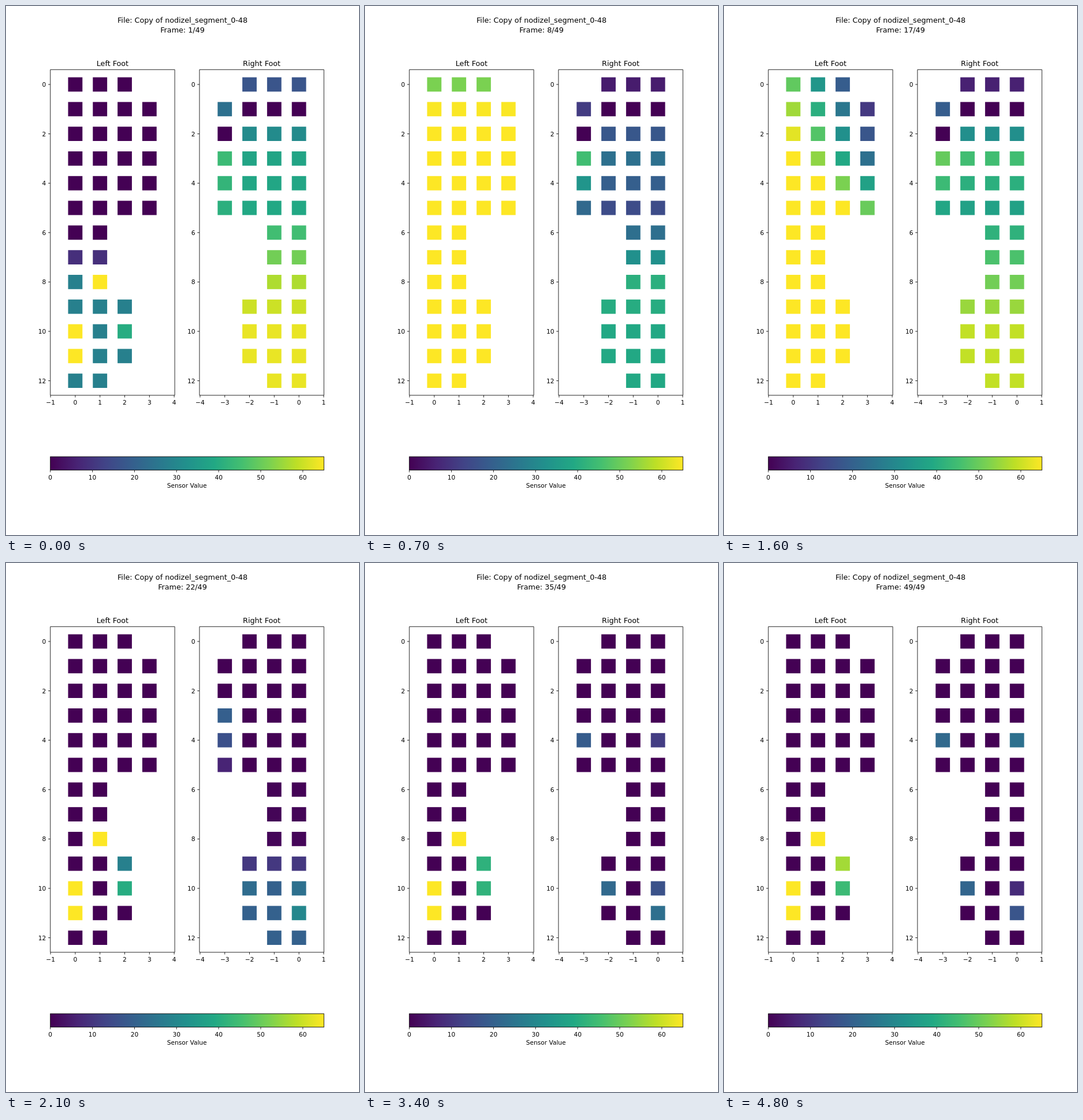
These frames come from a looping animation (611 by 917 pixels, 4.9 s). An HTML page:

```html
<!DOCTYPE html>
<html lang="en">
<head>
<meta charset="utf-8">
<title>Foot pressure</title>
<style>
  html, body { margin: 0; width: 100%; height: 100%; overflow: hidden; background: #fff; }
  svg { display: block; width: 611px; height: 917px; }
  text { font: 10.61px "DejaVu Sans", Verdana, sans-serif; fill: #000; text-anchor: middle; }
  text.big { font-size: 12.73px; }
  text.end { text-anchor: end; }
  .line { fill: none; stroke: #000; stroke-width: .85; }
</style>
</head>
<body>
<svg id="stage" viewBox="0 0 611 917"></svg>
<script>
const STEP = 100, STEPS = 49, MAX = 65;
const PITCH = 42.8, SIZE = 24.8, ROW0 = 136;
const VIRIDIS = ['440154', '482475', '414487', '355f8d', '2a788e', '21918c',
                 '22a884', '44bf70', '7ad151', 'bddf26', 'fde725'];
const RGB = VIRIDIS.map(h => [0, 2, 4].map(i => parseInt(h.slice(i, i + 2), 16)));
const stage = document.getElementById('stage');

const clamp = (v, lo, hi) => Math.min(Math.max(v, lo), hi);
const mix = (a, b, t) => a + (b - a) * t;
const signed = n => String(n).replace('-', '\u2212');

function add(tag, attrs, text, parent = stage) {
  const el = document.createElementNS('http://www.w3.org/2000/svg', tag);
  for (const k in attrs) el.setAttribute(k, attrs[k]);
  if (text !== undefined) el.textContent = text;
  parent.appendChild(el);
  return el;
}
const label = (x, y, text, cls = '') => add('text', { x, y, class: cls }, text);
const line = d => add('path', { d, class: 'line' });

function color(value) {
  const p = clamp(value / MAX, 0, 1) * 10;
  const i = Math.min(Math.floor(p), 9);
  return `rgb(${RGB[i].map((c, k) => Math.round(mix(c, RGB[i + 1][k], p - i)))})`;
}

// Index of the segment holding v in ascending points, and the position within it.
function locate(points, v) {
  const i = clamp(points.findIndex(p => p >= v) - 1, 0, points.length - 2);
  return [i, (v - points[i]) / (points[i + 1] - points[i])];
}

// Each gait key gives the load at these rows, then the strength of the sideways tilt.
const ZONES = [0, 3, 5, 8, 10, 12];
const feet = {
  left: {
    gait: {
      0: { load: [0, 0, -30, 28, 28], tilt: 0 },
      7: { load: [52, 90, 90, 90, 90], tilt: 0 },
      12: { load: [62, 90, 90, 90, 90], tilt: 0 },
      16: { load: [34, 54, 80, 90, 90], tilt: 15 },
      21: { load: [0, 0, 0, 0, 0], tilt: 0 }
    },
    lean: (row, i) => 1 - i,
    dead: () => false,
    // Pads that stay loaded while standing: row, column, value at first and at last.
    spots: [[8, 1, 65, 65], [10, 0, 65, 65], [11, 0, 65, 65], [9, 2, 28, 56], [10, 2, 40, 44]]
  },
  right: {
    gait: {
      0: { load: [17, 38, 39, 57, 63], tilt: 4 },
      7: { load: [5, 24, 15, 41, 39], tilt: 14 },
      12: { load: [3, 26, 16, 37, 30], tilt: 14 },
      16: { load: [6, 45, 37, 51, 59], tilt: 3 },
      21: { load: [0, 0, 0, 1, 20], tilt: 13 },
      30: { load: [0, 0, 0, 0, 0], tilt: 0 }
    },
    lean: (row, i) => i === 0 && row > 2 && row < 6 ? (6 - row) / 2 : 0,
    dead: (row, i) => row === 1 && i > 0 || row === 2 && i === 0,
    spots: [[4, -3, 16, 22], [4, 0, 0, 24], [10, -2, 23, 21], [10, 0, 24, 8], [11, 0, 30, 17]]
  }
};

function gaitAt(gait, step) {
  const keys = Object.keys(gait).map(Number);
  const [k, t] = locate(keys, Math.min(step, keys.at(-1)));
  const a = gait[keys[k]], b = gait[keys[k + 1]];
  return { load: a.load.map((v, z) => mix(v, b.load[z], t)), tilt: mix(a.tilt, b.tilt, t) };
}

function pressure({ foot, row, col, i }, { load, tilt }, step) {
  if (foot.dead(row, i)) return 0;
  const [z, t] = locate(ZONES, row);
  const base = mix(load[z], load[Math.min(z + 1, load.length - 1)], t);
  const spot = foot.spots.find(s => s[0] === row && s[1] === col);
  const rest = spot ? mix(spot[2], spot[3], clamp((step - 21) / 27, 0, 1)) : 0;
  return Math.max(base + tilt * foot.lean(row, i), rest);
}

// Toes taper to three pads, the arch is two wide, the heel is rounded off.
function padsInRow(row) {
  if (row === 0 || row > 8 && row < 12) return 3;
  return row < 6 ? 4 : 2;
}

const pads = [];
function panel(title, foot, x0, x1, zero, first) {
  const rightSide = foot === feet.right;
  label((x0 + x1) / 2, 104.2, title, 'big');
  for (let n = first; n < first + 6; n++) {
    const x = zero + n * PITCH;
    line(`M${x} 674.8v3.7`);
    label(x, 691.3, signed(n));
  }
  for (let row = 0; row <= 12; row++) {
    const y = ROW0 + row * PITCH;
    if (row % 2 === 0) {
      line(`M${x0} ${y}h-3.7`);
      label(x0 - 7.4, y + 3.9, row, 'end');
    }
    const count = padsInRow(row);
    for (let i = 0; i < count; i++) {
      const col = rightSide ? i - count + 1 : i;
      const el = add('rect', {
        x: zero + col * PITCH - SIZE / 2, y: y - SIZE / 2, width: SIZE, height: SIZE
      });
      pads.push({ el, foot, row, col, i });
    }
  }
  line(`M${x0} 110.3H${x1}V674.8H${x0}Z`);
}

function colorbar() {
  const grad = add('linearGradient', { id: 'scale' });
  VIRIDIS.forEach((h, i) => add('stop', { offset: i / 10, 'stop-color': '#' + h }, '', grad));
  const x = 76.75, y = 781.2, width = 473.5, height = 23.4;
  add('rect', { x, y, width, height, fill: 'url(#scale)' });
  add('rect', { x, y, width, height, class: 'line' });
  for (let n = 0; n <= 60; n += 10) {
    const tx = x + n / MAX * width;
    line(`M${tx} ${y + height}v3.7`);
    label(tx, 821.2, n);
  }
  label(313.2, 835.3, 'Sensor Value');
}

label(305.5, 29, 'File: Copy of nodizel_segment_0-48', 'big');
const counter = label(305.5, 45.8, '', 'big');
panel('Left Foot', feet.left, 76.75, 292.1, 119.9, -1);
panel('Right Foot', feet.right, 334.9, 550.25, 507.1, -4);
colorbar();

let shown = -1;
function draw(now) {
  const step = Math.floor(now / STEP) % STEPS;
  if (step === shown) return;
  shown = step;
  for (const foot of Object.values(feet)) foot.now = gaitAt(foot.gait, step);
  for (const pad of pads) pad.el.setAttribute('fill', color(pressure(pad, pad.foot.now, step)));
  counter.textContent = `Frame: ${step + 1}/${STEPS}`;
}

const start = performance.now();
function tick() {
  draw(performance.now() - start);
  requestAnimationFrame(tick);
}
tick();
</script>
</body>
</html>
```
